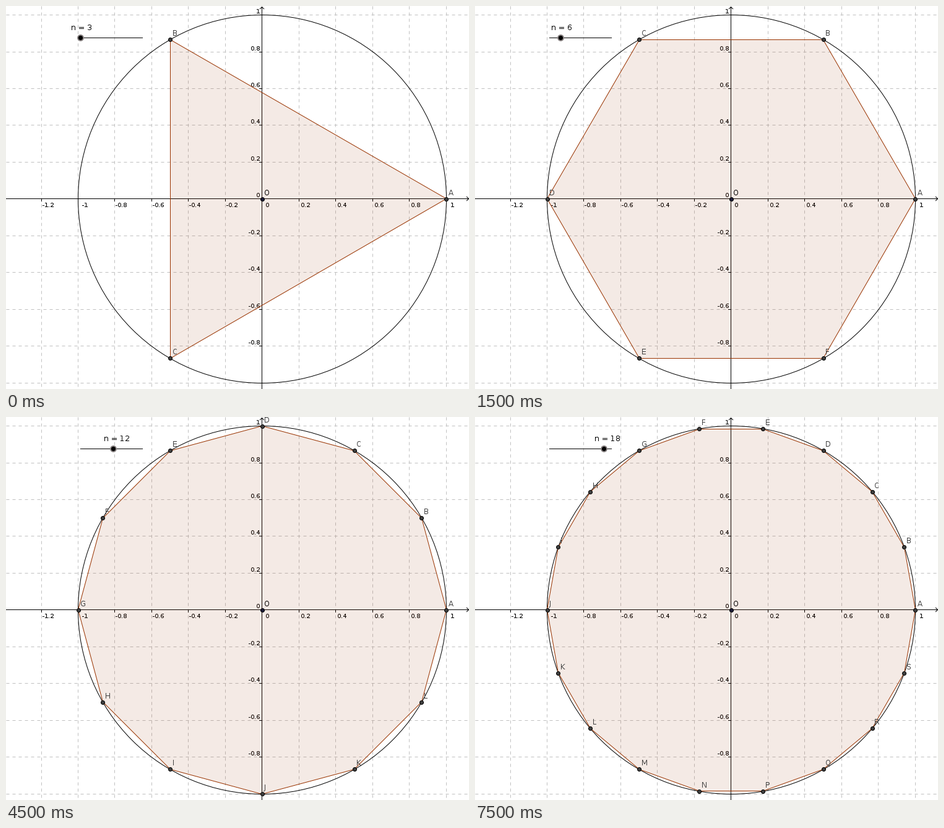
These frames come from a looping animation (748x619 px, 8 s). A matplotlib script:

```python
import numpy as np
import matplotlib.pyplot as plt
from matplotlib.animation import FuncAnimation
from matplotlib.patches import Circle, Polygon

W, H, DPI = 748, 619, 64
PT = 72 / DPI                      # points per pixel
CX, CY, UNIT = 413.86, 311.9, 297.35
N_MIN, N_MAX, N_LAST = 3, 20, 18
SLIDER_X, SLIDER_Y, SLIDER_LEN = 120, 51.5, 100
BROWN = "#993300"
NAMES = "ABCDEFGHIJKLMNPQRSTU"     # O is the centre

plt.rcParams["font.family"] = "DejaVu Sans"
plt.rcParams["text.hinting"] = "default"
plt.rcParams["text.hinting_factor"] = 1
fig = plt.figure(figsize=(W / DPI, H / DPI), dpi=DPI, facecolor="white")
ax = fig.add_axes([0, 0, 1, 1])
ax.set_xlim(0, W)
ax.set_ylim(H, 0)
ax.axis("off")


def px(v):
    """Middle of the pixel that holds v."""
    return np.floor(v) + 0.5


def line(xs, ys, color="black", z=2, **kw):
    return ax.plot(xs, ys, color=color, lw=PT, zorder=z, snap=False,
                   solid_capstyle="butt", **kw)[0]


def text(x, y, s, size=12, color="black", z=8, ha="left"):
    return ax.text(x, y, s, fontsize=size * PT, color=color, ha=ha,
                   va="baseline", zorder=z)


def disc(x, y, r, face, edge="none", z=7):
    return ax.add_patch(Circle((x, y), r, facecolor=face, edgecolor=edge,
                               lw=PT, zorder=z))


def point(x, y, name, face="#404040", color="#404040"):
    return [disc(px(x + 0.5), px(y + 0.5), 3, face, "black"),
            text(np.floor(x) + 4, np.floor(y + 0.5) - 6, name, color=color)]


def draw_grid():
    dash = dict(color="#c0c0c0", z=1, linestyle=(0, (5, 5)),
                dash_capstyle="butt")
    for k in range(-6, 6):
        x = CX + k * UNIT / 5
        line([px(x)] * 2, [312, 316])
        if k:
            line([px(x)] * 2, [0.5, H], **dash)
            text(x + 10, 325, f"{k / 5:g}", 10, z=2, ha="center")
    text(419, 325, "0", 10, z=2)
    for k in range(-5, 6):
        y = CY - k * UNIT / 5
        if k:
            line([0.5, W], [px(y)] * 2, **dash)
        if k > -5:
            line([409, 413], [px(y)] * 2)
            text(410, np.floor(y - 2), f"{k / 5:g}", 10, z=2, ha="right")


def draw_axes():
    x, y = px(CX), px(CY)
    line([0, W], [y, y])
    line([x, x], [1, H])
    line([W - 4, W - 0.5, W - 4], [y - 3.5, y, y + 3.5])
    line([x - 3.5, x, x + 3.5], [5, 1.5, 5])


draw_grid()
draw_axes()
left, right = px(CX - UNIT), px(CX + UNIT)
top, bottom = px(CY - UNIT), px(CY + UNIT)
ax.add_patch(Circle(((left + right) / 2, (top + bottom) / 2),
                    (right - left) / 2, fill=False, edgecolor="black",
                    lw=PT, zorder=4))
line([SLIDER_X, SLIDER_X + SLIDER_LEN + 1], [SLIDER_Y, SLIDER_Y], z=6)
point(CX, CY, "O", face="#1c1c38", color="black")

moving = []


def update(i):
    while moving:
        moving.pop().remove()
    n = N_MIN + i

    t = 2 * np.pi * np.arange(n) / n
    xs, ys = CX + UNIT * np.cos(t), CY - UNIT * np.sin(t)
    moving.append(ax.add_patch(Polygon(np.column_stack([xs, ys]),
                                       facecolor=BROWN, alpha=0.1,
                                       edgecolor="none", zorder=3)))
    ex, ey = px(xs), px(ys)
    for j in range(n):
        k = (j + 1) % n
        moving.append(line([ex[j], ex[k]], [ey[j], ey[k]], BROWN, z=5))
        moving.extend(point(xs[j], ys[j], NAMES[j]))

    knob = SLIDER_X + SLIDER_LEN * (n - N_MIN) / (N_MAX - N_MIN)
    moving.append(disc(px(knob + 0.5), SLIDER_Y, 5.5, "#8c8686"))
    moving.append(disc(px(knob + 0.5), SLIDER_Y, 3.6, "black"))
    moving.append(text(np.floor(knob + 0.5) - 15, 39, f"n = {n}"))
    return moving


anim = FuncAnimation(fig, update, frames=N_LAST - N_MIN + 1, interval=500,
                     repeat=True, repeat_delay=0, blit=False)
plt.show()
```
